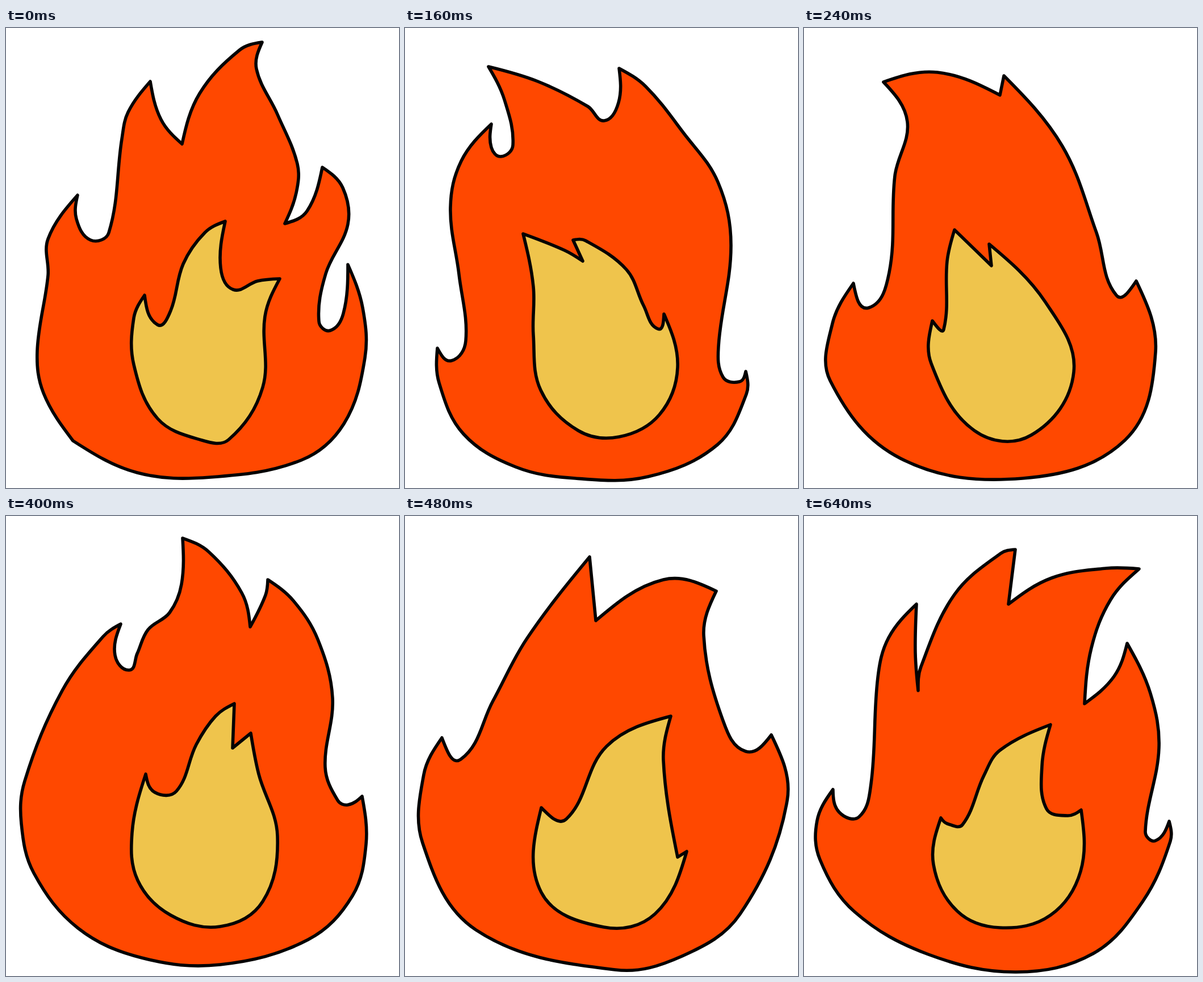
An HTML page that plays this animation: 692x809 px, repeating every 720 ms.

```html
<!DOCTYPE html>
<html lang="en">
<head>
<meta charset="utf-8">
<title>Flame</title>
<style>
html, body { margin: 0; width: 100%; height: 100%; overflow: hidden; background: #fff; }
svg { display: block; width: 100%; height: 100%; }
path { stroke: #050303; stroke-width: 5.6; stroke-linejoin: round; }
#outer { fill: #ff4800; }
#inner { fill: #efc44c; }
</style>
</head>
<body>
<svg viewBox="0 0 692 809"><path id="outer"/><path id="inner"/></svg>
<script>
const STEP = 80;
const poses = [];

// Closed smooth curve through a few points; * marks a sharp corner.
function outline(text) {
  const pts = text.trim().split(/\s+/).map(t => {
    const [x, y] = t.split(",").map(parseFloat);
    return { x, y, corner: t.endsWith("*") };
  });
  const at = i => pts[(i + pts.length) % pts.length];
  const mid = (p, q) => ({ x: (p.x + q.x) / 2, y: (p.y + q.y) / 2 });
  const handle = (i, len) => {
    const p = at(i), a = at(i - 1), b = at(i + 1);
    if (p.corner) return p;
    const k = len * 0.36 / Math.hypot(b.x - a.x, b.y - a.y);
    return { x: p.x + (b.x - a.x) * k, y: p.y + (b.y - a.y) * k };
  };
  const show = p => p.x.toFixed(1) + " " + p.y.toFixed(1);
  let d = "M" + show(pts[0]);
  pts.forEach((p, i) => {
    const q = at(i + 1);
    const len = Math.hypot(q.x - p.x, q.y - p.y);
    let c = handle(i, len), e = handle(i + 1, -len);
    if (p.corner && !q.corner) c = mid(p, e);
    if (q.corner && !p.corner) e = mid(q, c);
    d += "C" + [c, e, q].map(show).join(" ");
  });
  return d + "Z";
}

function pose(outer, inner) {
  poses.push([outline(outer), outline(inner)]);
}

pose(`451,25* 441,72 478,152 513,239 511,290 491,344* 530,322 557,245* 593,281 602,345
  563,432 551,516 571,532 594,502 602,416* 628,492 632,580 595,696 520,760 360,790
  231,782 118,726* 66,642 55,568 74,435 74,371 126,294* 124,336 149,373 181,360
  204,195 215,148 254,94* 273,161 310,204* 341,115 411,39`,
  `386,340* 378,422 400,460 443,445 482,441* 456,507 452,632 392,724 345,725 267,687
  225,592 225,510 244,470* 267,522 290,497 312,415 350,360`);

pose(`420,17* 417,80 486,183 550,320 566,410 552,540 576,580 602,510* 612,640 530,754
  350,791 160,756 60,620 62,515* 84,528 90,460 78,350 139,232* 145,290 177,296
  191,190 200,81* 250,150 330,184* 370,65`,
  `342,352* 372,415 424,492 468,471* 467,610 412,710 325,716 240,635 226,416* 262,458
  296,400`);

pose(`147,68* 234,94 322,138 351,163 376,131 377,71* 424,103 490,184 551,271 574,382
  552,560 560,614 589,622 600,604* 601,644 550,733 428,789 300,792 195,772 103,714
  60,624 57,563* 82,585 107,550 95,433 80,316 99,234 152,169* 152,210 169,226
  190,206 175,126`,
  `208,362* 281,391 313,410* 296,373* 318,374 390,425 420,488 445,529 456,503* 480,597
  448,680 377,719 305,708 239,637 226,540 226,455`);

pose(`140,95* 235,78 345,118* 352,84* 455,208 515,360 550,470 585,445* 619,570 565,725
  385,792 170,757 46,620 50,520 87,449* 114,492 150,430 160,260 182,165`,
  `265,355* 330,418* 326,380* 425,482 475,605 400,716 300,708 224,590 226,515* 246,530
  252,410`);

pose(`137,128* 190,85 252,74 333,99 409,181 464,298 499,338 530,330 549,306* 606,381
  635,485 623,598 571,718 503,769 389,792 251,785 101,717 37,627 29,545 60,427
  116,338* 107,379 137,398 184,362 209,268 213,195 185,146`,
  `320,349* 330,397 347,426* 355,386* 410,452 456,527 474,620 445,697 385,723 291,706
  233,653 217,560 226,532* 244,567 266,553 275,440`);

pose(`311,39* 357,63 415,135 430,195* 457,139 461,112* 506,149 549,217 575,320 562,442
  584,500 602,508 627,493* 634,577 610,668 532,745 377,789 239,777 127,725 49,628
  27,541 33,466 99,307 171,212 202,190* 192,245 217,271 231,242 250,200 288,170
  309,120`,
  `402,330* 399,408* 431,382* 445,454 478,563 452,678 377,722 290,702 232,641 222,557
  246,454* 262,486 300,484 335,402 369,352`);

pose(`325,72* 336,184* 455,112 548,132* 526,210 560,360 600,414 645,385* 673,500 590,700
  488,774 370,798 125,728 31,575 33,455 65,390* 98,428 155,325 215,215`,
  `468,352* 455,430 480,600* 496,590* 440,700 350,723 240,662 240,513* 284,533 355,405`);

pose(`341,116* 321,172 320,201* 394,139 470,110 542,109 600,123 626,153* 555,189 538,270
  566,330 596,342 629,306* 660,360 666,465 648,592 542,737 444,796 350,804 251,793
  93,706 43,605 29,480 51,366 75,331* 79,371 110,391 158,359 207,246 250,185`,
  `536,378* 514,443 507,557 467,645* 488,646 504,627* 475,671 405,715 303,720 241,681
  230,597 237,572* 259,587 282,556 312,494 386,419 475,377`);

pose(`372,59* 360,155* 436,109 532,92 590,93* 540,147 506,232 494,330* 546,282 569,224*
  610,312 625,408 601,555 619,571 643,537* 645,572 597,677 510,769 374,802 219,771
  89,696 28,604 23,536 51,481* 62,521 97,529 118,471 130,284 149,214 198,155*
  196,240 201,307* 206,265 265,138 346,66`,
  `434,367* 419,440 427,515 464,527 488,517* 487,625 434,702 345,724 270,695 228,613
  241,531* 252,541 279,543 317,456 345,412`);

const parts = ["outer", "inner"].map(id => document.getElementById(id));
const start = performance.now();
let shown = -1;

function draw() {
  const i = Math.floor((performance.now() - start) / STEP) % poses.length;
  if (i !== shown) {
    parts.forEach((part, k) => part.setAttribute("d", poses[i][k]));
    shown = i;
  }
  requestAnimationFrame(draw);
}
draw();
</script>
</body>
</html>
```
